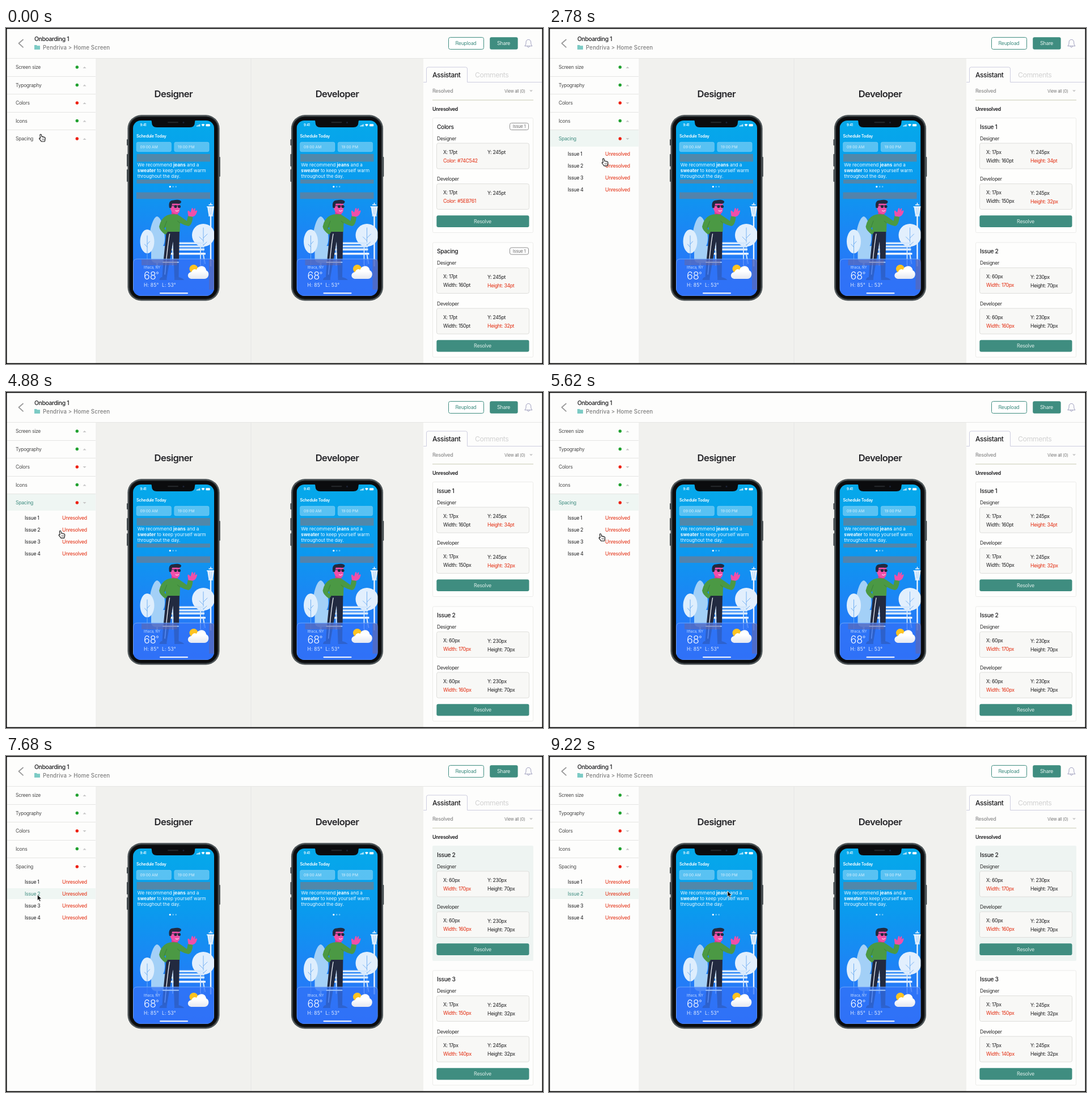
Animation, 947 px wide and 592 px high, one loop 9320 ms. Source, as an HTML page:

```html
<!DOCTYPE html>
<html lang="en">
<head>
<meta charset="utf-8">
<title>Design review</title>
<style>
  html, body { margin: 0; width: 100%; height: 100%; overflow: hidden; background: #fdfdfc; }
  svg { display: block; width: 947px; height: 592px; }
  text { font-family: Inter, "Noto Sans", sans-serif; letter-spacing: -.035em; white-space: pre; }
  .wide text { letter-spacing: 0; }
</style>
</head>
<body>
<svg id="stage" viewBox="0 0 947 592"></svg>
<script>
const TEAL = '#3f8d80', RED = '#e3290c', INK = '#1c1c1e';
const LOOP = 9320, OPEN_AT = 1060, PICK_AT = 7140;

const rect = (x, y, w, h, fill, r = 0, more = '') =>
  `<rect x="${x}" y="${y}" width="${w}" height="${h}" rx="${r}" fill="${fill}" ${more}/>`;
const box = (x, y, w, h, fill, stroke, r = 0) =>
  rect(x + .5, y + .5, w - 1, h - 1, fill, r, `stroke="${stroke}"`);
const disc = (x, y, r, fill) => `<circle cx="${x}" cy="${y}" r="${r}" fill="${fill}"/>`;
const oval = (x, y, rx, ry, fill) => `<ellipse cx="${x}" cy="${y}" rx="${rx}" ry="${ry}" fill="${fill}"/>`;
const path = (d, fill, more = '') => `<path d="${d}" fill="${fill}" ${more}/>`;
const line = (d, color, w = 1) =>
  path(d, 'none', `stroke="${color}" stroke-width="${w}" stroke-linecap="round" stroke-linejoin="round"`);
const text = (x, y, s, size = 8.7, fill = INK, weight = 400, more = '') =>
  `<text x="${x}" y="${y}" font-size="${size}" fill="${fill}" font-weight="${weight}" ${more}>${s}</text>`;
const mid = 'text-anchor="middle"';
const caret = (x, y, down) =>
  path(`M${x - 3} ${y + (down ? -1.5 : 1.5)}h6l-3 ${down ? 3 : -3}z`, '#c6c6c6');

function header() {
  return line('M30 20.5L22.5 27L30 33.8', '#9b9b9b', 1.8)
    + text(50, 23, 'Onboarding 1', 10.4, INK, 500)
    + path('M50 30h4l1 1.2h5v6.8h-10z', '#7ccbc5')
    + text(65, 37.5, 'Pendriva &gt; Home Screen', 9.7, '#7d7d7d', 500, 'style="letter-spacing:.015em"')
    + box(780, 16, 63, 22, '#fff', TEAL, 3)
    + text(811, 30.3, 'Reupload', 8.9, TEAL, 400, mid)
    + rect(853.2, 16.3, 49.4, 21.4, TEAL, 3)
    + text(877.5, 30.3, 'Share', 9, '#e6f3ef', 400, mid)
    + line('M915 31.5C917 29.5 917 28 917 25.5C917 22 918.8 20.5 921.3 20.5S925.7 22 925.7 25.5C925.7 28 925.7 29.5 927.7 31.5ZM919.5 32C919.8 35 922.8 35 923.2 32', '#9c9cbd');
}

function frame() {
  return rect(0, 0, 947, 592, '#fdfdfc')
    + rect(159, 54, 577, 538, '#f1f1ee')
    + rect(431.5, 54, 1, 538, '#e6e6e3')
    + rect(0, 53, 947, 1, '#e6e6e4')
    + rect(158.5, 54, 1, 538, '#ebebe9')
    + header()
    + text(295.3, 122, 'Designer', 16.6, '#252529', 600, mid)
    + text(584, 122, 'Developer', 16.6, '#252529', 600, mid)
    + line('M736.5 95.5H741.5V72Q741.5 69 744.5 69H810.5Q813.5 69 813.5 72V95.5H945', '#cdcddf')
    + text(752, 87, 'Assistant', 12, INK, 500)
    + text(827, 87, 'Comments', 12.3, '#d2d2d2')
    + text(752, 114.3, 'Resolved', 8.9, '#8d8d8d', 500)
    + text(879, 114, 'View all (0)', 7.5, '#777')
    + caret(926, 111, true)
    + rect(752, 126.5, 178, 1, '#c8cab3')
    + text(752, 146, 'Unresolved', 8.7, INK, 600);
}

const ROWS = ['Screen size', 'Typography', 'Colors', 'Icons', 'Spacing'];

// pick: 0 closed, 1 Spacing open, 2 an issue chosen
function sidebar(pick) {
  let s = '';
  if (pick === 1) s += rect(2, 180, 156, 29, '#eff6f3');
  if (pick === 2) s += rect(2, 233, 156, 19, '#eff6f3');
  ROWS.forEach((name, i) => {
    const y = 69 + 31.5 * i, bad = i === 2 || i === 4;
    if (i) s += rect(2, Math.round(y - 16), 156, 1, '#e5e5e3');
    s += text(17, y + 3.2, name, 8.6, pick === 1 && i === 4 ? TEAL : '#4a4a4a')
      + disc(125.3, y, 2.7, bad ? '#ee2010' : '#21a130')
      + caret(138.5, y + .5, pick && bad);
  });
  for (let i = 1; pick && i < 5; i++) {
    const y = 203.6 + 21 * i;
    s += text(33, y, 'Issue ' + i, 8.7, pick === 2 && i === 2 ? TEAL : INK)
      + text(99, y, 'Unresolved', 8.7, RED);
  }
  return s;
}

// values: [x, y, third, fourth]; a leading "!" marks a mismatch
function specs(y, label, values, edge) {
  let s = text(760, y - 4.6, label, 8.6, '#2c2c2c') + box(759, y, 164, 46, '#f8f8f6', edge, 3);
  values.forEach((v, i) => {
    const bad = v[0] === '!';
    s += text(i % 2 ? 849 : 771, y + (i > 1 ? 34 : 19) + (i % 2 ? .5 : 0), bad ? v.slice(1) : v, 8.7, bad ? RED : INK);
  });
  return s;
}

function card(y, title, a, b, badge, lit) {
  return (lit ? rect(752, y, 178, 203, '#eef4f2', 2) : box(752, y, 178, 203, '#fefefd', '#ebebe9', 2))
    + text(760, y + 19.7, title, 10.2, INK, 500)
    + (badge ? box(888, y + 9, 34, 13, '#fff', '#8f8f8f', 3)
      + text(905, y + 18.3, 'Issue 1', 7.7, '#6d6d6d', 400, mid) : '')
    + specs(y + 44.5, 'Designer', a, '#dededb')
    + specs(y + 116, 'Developer', b, '#dededb')
    + rect(759.3, y + 172.2, 163.2, 20.8, TEAL, 3)
    + text(840.5, y + 185.8, 'Resolve', 8.9, '#d9ebe6', 400, mid);
}

const size = (x, y, w, h) => [`X: ${x}px`, `Y: ${y}px`, w, `Height: ${h}px`];
const issue2 = w => size(60, 230, `!Width: ${w}px`, 70);
const issue3 = w => size(17, 245, `!Width: ${w}px`, 32);

const PANELS = [
  () => card(158, 'Colors', ['X: 17pt', 'Y: 245pt', '!Color: #74C542'], ['X: 17pt', 'Y: 245pt', '!Color: #5EB761'], true)
    + card(377.5, 'Spacing', ['X: 17pt', 'Y: 245pt', 'Width: 160pt', '!Height: 34pt'],
      ['X: 17pt', 'Y: 245pt', 'Width: 150pt', '!Height: 32pt'], true),
  () => card(158, 'Issue 1', ['X: 17px', 'Y: 245px', 'Width: 160pt', '!Height: 34pt'],
      ['X: 17px', 'Y: 245px', 'Width: 150px', '!Height: 32px'])
    + card(377.5, 'Issue 2', issue2(170), issue2(160)),
  () => card(158, 'Issue 2', issue2(170), issue2(160), false, true)
    + card(377.5, 'Issue 3', issue3(150), issue3(140))
];

function park() {
  const pale = '#deeefd', slat = '#d3e7fc', far = '#a3d0f7';
  let s = path('M266.5 332C274 333 280 357 280 370Q280 388 268 390V420H265V390Q253 388 253 370C253 357 259 333 266.5 332Z', far)
    + rect(256, 384, 32, 30, far, 8)
    + oval(249, 376, 12.5, 21, pale) + line('M249 366V420M249 386L244.5 381M249 381L253.5 376', '#6eaef2')
    + rect(359.8, 330, 2.4, 90, '#eaf4fe')
    + path('M355 315h12l-2.4 15h-7.2z', '#e2f0fd') + line('M354.5 315h13M358 311.5h6M361 308.5V311M357.6 331h7', '#f6faff', 1.4)
    + line('M359.3 317l.7 11M362.7 317l-.7 11', '#8ec3f7', .7)
    + disc(348, 365, 20, '#e2effd')
    + line('M348 352V420M348 375L341 368M348 370L355 363M348 383L354 377', '#76b1f3');
  for (let i = 0; i < 3; i++) s += rect(288, 377.5 + i * 5.4, 62, 3.6, slat, 1);
  return s + rect(283, 396, 69, 3.4, '#eef6ff', 1)
    + line('M294 378V418M343 378V418M288 399L285 415M348 399L351 415', slat, 1.8);
}

function person() {
  const pink = '#f04fa9', green = '#4b9944', navy = '#222a40';
  return path('M283 354H306L304.5 440H297L294.5 376L283.5 440H275.5C277 410 281 382 283 354Z', navy)
    + line('M288.5 363C285 382 283 405 280.2 434', '#f5f7fb', 1.3)
    + path('M274 439h9.5v5H270.5q0-3 3.5-5zM297 439h7.5q7 1.5 10 5H297z', '#20304f')
    + path('M292 320H303V332H292Z', '#d93a92')
    + path('M289.5 308H306.5V321Q305.5 328 299.5 327.5Q290.5 326 289.5 316Z', pink)
    + path('M288 317C286.5 309 288 303.5 295 303.5C301 302 309 302.5 309 306.5Q308 310.5 302 309.5H293L291.5 317Z', navy)
    + disc(299, 314.5, 2.6, navy) + disc(305.5, 314.5, 2.6, navy) + line('M290 313H306', navy, 1)
    + line('M299 322Q302 324 304.5 321.5', '#fff', 1)
    + path('M284 330Q291 327 302 328.5Q308 332 319 340L321 330.5L329.5 333Q328 348 321.5 349Q314 347.5 307 343.5L306.5 359H282V351L279 352.5L285 360L281 364Q271 357 270 350Q273 335 284 330Z', green)
    + line('M283.5 340L279 352M306.5 343.5L302.5 340', '#377d38', .9)
    + path('M321.5 331.5L320.5 325Q320 320.5 322.5 322L325.5 325L327.5 318Q329 315.5 330 319L330 321.5L332.5 317.5Q334.5 317 333.5 321L333 323Q337.5 319.5 337 323Q335 331.5 329 332.5Z', pink);
}

function weather() {
  return `<g class="wide">`
    + path('M224.5 472V414Q224.5 407 231.5 407H360Q367 407 367 414V472Z', '#3173f8', 'fill-opacity=".76" stroke="#82b0f8" stroke-width=".8"')
    + rect(276, 411.7, 29, 2, '#9fc5fb', 1)
    + text(243, 424, 'Ithaca, NY', 5.9, '#c6dcfd')
    + text(243, 443, '68', 18, '#fff', 300)
    + `<circle cx="267" cy="431.5" r="1.6" fill="none" stroke="#fff" stroke-width=".8"/>`
    + text(243, 455.5, 'H: 85°', 8.4, '#e2edfe', 400, 'style="letter-spacing:.03em"')
    + text(275, 455.5, 'L: 53°', 8.4, '#e2edfe', 400, 'style="letter-spacing:.03em"')
    + disc(331, 424.5, 7.5, '#fdc321')
    + path('M328 442C319 442 318.5 431 327 430C329 425 333 424 336 426C339 417 352 417.5 353 427C360 430 358 442 350 442Z', 'url(#cloud)')
    + rect(271, 466.3, 50, 2, '#fff', 1) + `</g>`;
}

function statusBar() {
  let s = text(236.5, 173, '9:41', 5.8, '#fff', 600);
  for (let i = 0; i < 4; i++) s += rect(336 + i * 1.7, 172 - i * .8, 1.1, 1.5 + i * .8, '#fff');
  return s + path('M344.5 170.2Q347.5 167.6 350.5 170.2L347.5 173.5Z', '#fff')
    + rect(352.5, 169.3, 7.2, 4, '#fff', 1);
}

function phone() {
  const pill = x => rect(x, 201, 61.5, 17, '#fff', 3, 'fill-opacity=".33" stroke="#fff" stroke-opacity=".25" stroke-width=".7"');
  const btn = (x, y, h) => rect(x, y, 2, h, '#42494c', 1);
  return btn(213, 196, 11) + btn(213, 222, 22) + btn(213, 249, 22) + btn(375.8, 227, 35)
    + rect(214.5, 153.3, 162, 327.2, '#33393c', 24)
    + rect(216, 154.8, 159, 324.2, '#0b0c0e', 22.5, 'stroke="#6a7578" stroke-width="1.2"')
    + rect(217.4, 156.2, 156.2, 321.4, 'none', 21, 'stroke="#25292b" stroke-width="1.4"')
    + `<g clip-path="url(#glass)">` + rect(224, 163, 143, 309, 'url(#sky)')
    + park() + person() + weather() + `</g>`
    + path('M254 162H336Q333 162 333 166Q333 175 324 175H266Q257 175 257 166Q257 162 254 162Z', '#0b0c0e')
    + rect(285, 165.3, 19, 2, '#26292c', 1) + disc(313, 166.4, 1.5, '#1d2538')
    + statusBar()
    + text(230, 193, 'Schedule Today', 7.25, '#fff', 600)
    + pill(230) + pill(296.7) + `<g class="wide">`
    + text(236.5, 212, '09:00 AM', 6.7, '#d8effc') + text(303, 212, '19:00 PM', 6.7, '#d8effc')
    + text(231.8, 244, 'We recommend <tspan font-weight="700">jeans</tspan> and a', 8.2, '#effaff')
    + text(231.8, 254, '<tspan font-weight="700">sweater</tspan> to keep yourself warm', 8.2, '#effaff')
    + text(231.8, 264, 'throughout the day.', 8.2, '#effaff') + `</g>`
    + disc(289.3, 279.6, 1.6, '#fff') + disc(294.7, 279.6, 1.3, '#6cc3f4') + disc(299.7, 279.6, 1.3, '#6cc3f4');
}

function gaps(all) {
  const bar = (x, y, w, h) => rect(x, y, w, h, '#7d7984', 0, 'fill-opacity=".62"');
  const soft = (x, y, w, h) => rect(x, y, w, h, '#75628e', 0, 'fill-opacity=".42"');
  return bar(230.5, 222, 129.5, 13.5)
    + (all ? bar(230.5, 267, 129.5, 7) + bar(230, 289.5, 130, 11.5) + soft(239, 408, 63, 10) + soft(358, 408, 9, 53) : '');
}

const twice = id => `<use href="#${id}"/><use href="#${id}" x="288.5"/>`;

document.getElementById('stage').innerHTML = `<defs>
  <linearGradient id="sky" x1="0" y1="0" x2="0" y2="1">
    <stop offset="0" stop-color="#05a9ea"/><stop offset=".35" stop-color="#0a9bee"/>
    <stop offset=".7" stop-color="#1f81f6"/><stop offset="1" stop-color="#2d6dfa"/>
  </linearGradient>
  <linearGradient id="cloud" x1="0" y1="0" x2="0" y2="1">
    <stop offset=".4" stop-color="#fff"/><stop offset="1" stop-color="#e5e8f0"/>
  </linearGradient>
  <clipPath id="glass">${rect(224, 163, 143, 309, '#000', 14)}</clipPath>
  <g id="phone">${phone()}</g><g id="gapAll">${gaps(true)}</g><g id="gapOne">${gaps(false)}</g>
  </defs>`
  + frame() + twice('phone')
  + PANELS.map((panel, i) => `<g class="state">${twice(i < 2 ? 'gapAll' : 'gapOne')}${sidebar(i)}${panel()}</g>`).join('')
  + rect(.75, .75, 945.5, 590.5, 'none', 0, 'stroke="#000" stroke-width="1.5"')
  + `<g id="arrow">${path('M0 0V10.4L2.4 8.2L4 12L5.9 11.2L4.3 7.5H7.6Z', '#0a0a0a', 'stroke="#fff" stroke-width=".8"')}</g>`
  + `<g id="hand">${path('M-1.6 1C-1.6 -.6 .7 -.8 1 .8L1.6 4.2Q3 3.3 3.8 4.6Q5.2 3.9 6 5.2Q7.6 4.8 7.8 6.6C8 9 7.3 10 6.8 12.5H.8C0 10.6 -2.2 9 -2.9 7.2Q-2.8 5.8 -.8 6.8Z', '#fff', 'stroke="#141414" stroke-width="1.1" stroke-linejoin="round"')}${line('M2.4 7.4V10M4.2 7.4V10M5.9 7.4V10', '#333', .6)}</g>`;

// [time, x, y] of the pointer tip
const TRACK = [
  [0, 61.5, 187.5], [300, 61.5, 187.5], [900, 40.8, 187], [2000, 40.8, 187], [3000, 104, 236.5],
  [4300, 104, 236.5], [5300, 91, 250], [5800, 91, 250], [6600, 55.3, 244.5],
  [8350, 55.3, 244.3], [9100, 314.8, 237.8], [LOOP, 314.8, 237.8]
];

function tipAt(t) {
  const i = TRACK.findIndex(k => k[0] > t);
  const [t0, x0, y0] = TRACK[i - 1], [t1, x1, y1] = TRACK[i];
  const p = (t - t0) / (t1 - t0), e = p * p * (3 - 2 * p);
  return [x0 + (x1 - x0) * e, y0 + (y1 - y0) * e];
}

const states = [...document.querySelectorAll('.state')];
const arrow = document.getElementById('arrow'), hand = document.getElementById('hand');
const show = (el, on) => el.setAttribute('display', on ? 'inline' : 'none');
const start = performance.now();

function draw(now) {
  const t = Math.max(0, now - start) % LOOP;
  const state = t < OPEN_AT ? 0 : t < PICK_AT ? 1 : 2;
  const pointing = t < OPEN_AT || (t > 2150 && t < PICK_AT);
  const [x, y] = tipAt(t);
  states.forEach((el, i) => show(el, i === state));
  show(hand, pointing);
  show(arrow, !pointing);
  (pointing ? hand : arrow).setAttribute('transform', `translate(${x.toFixed(2)} ${y.toFixed(2)})`);
  requestAnimationFrame(draw);
}
draw(start);
</script>
</body>
</html>
```
